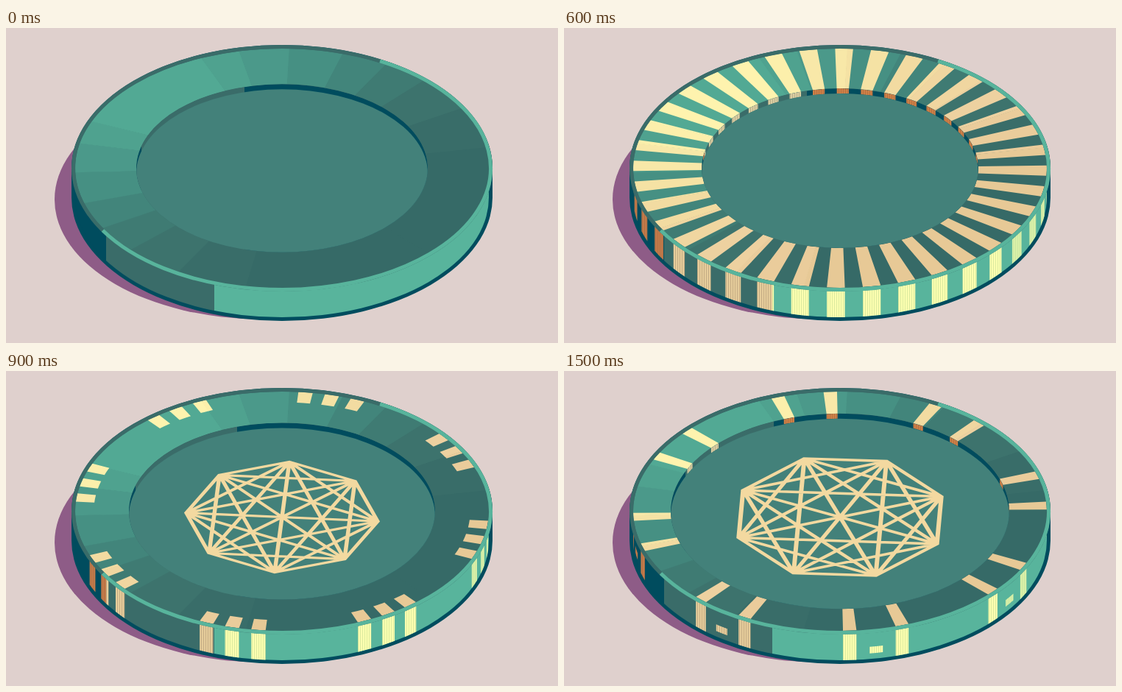
Write an HTML page that moves like this. It is 750x428 px and loops after 1.8 s.

```html
<!DOCTYPE html>
<html lang="en">
<head>
<meta charset="utf-8">
<title>Token patterns</title>
<style>
  html, body { margin: 0; width: 100%; height: 100%; overflow: hidden; background: #dfd0cd; }
  svg { display: block; width: 100%; height: 100%; }
</style>
</head>
<body>
<svg id="stage" viewBox="0 0 750 428"></svg>
<script>
const CX = 375, CY = 190.5, RX = 281, RY = 162.5, HEIGHT = 40;
const TILT = 0.577, WELL_DEPTH = 7, STEP = 300;
const DARK = '#004c5e', MID = '#3a6c69', LIGHT = '#58b49c', FLOOR = '#43817a', LINE = '#f3d9a0';

// Shading falls off on both sides of the light direction.
const LIGHT_ANGLE = 225;
const LIMITS = [22, 33, 47, 62, 75, 88, 105, 125, 180];
const GREEN = ['#52a994', '#4fa28f', '#4b998a', '#469083', '#42857b', '#3f7b73', '#3d736d', '#396d69', '#366a67'];
const CREAM = ['#fef3ae', '#fcefab', '#f8e8a8', '#f5e2a4', '#f2dba1', '#f0d6a0', '#edd1a0', '#eacc9b', '#e7c996'];

// Each side zone: left x, right x, wall fill, stripe fill.
const SIDE_ZONES = [
  [0, 136, DARK, 'brown'], [136, 283, MID, 'tan'],
  [283, 600, LIGHT, 'yellow'], [600, 750, LIGHT, 'lime']
];
const STRIPES = {
  brown: ['#c27b4a', '#b36f45'], tan: ['#e6cd9b', '#c4ab83'],
  yellow: ['#fcffb0', '#dcea9f'], lime: ['#d9f0a8', '#cbe7a2'],
  orange: ['#cc8048', '#b8703f'], sand: ['#d9cea2', '#b9ae8a']
};

const repeat = (count, offset, width) => Array.from({ length: count }, (_, i) => {
  const a = offset + i * 360 / count;
  return [a - width / 2, a + width / 2];
});

const DESIGNS = [
  { well: 198, tip: 184, split: 324, bars: [] },
  { well: 192, tip: 189, split: 330, bars: repeat(12, 0.45, 3.75) },
  { well: 188, tip: 191, split: 330, bars: repeat(36, 1.15, 5) },
  { well: 208, tip: 176, split: 314, reach: 0.91, star: [130.5, 4.4, 5.5],
    bars: [-7.45, 0, 7.45].flatMap(d => repeat(8, 14 + d, 4)) },
  { well: 229.5, tip: 163, split: 287, bars: repeat(8, 9.1, 18.7) },
  { well: 230, tip: 165, split: 285, star: [146, 25.6, 6], chips: repeat(8, 34.9, 3.75),
    bars: [-7.4, 7.4].flatMap(d => repeat(8, 34.9 + d, 3.75)) }
];

const f = n => n.toFixed(2);
function at(angle, rx, ry, dy = 0) {
  const a = angle * Math.PI / 180;
  return `${f(CX + rx * Math.cos(a))} ${f(CY + dy + ry * Math.sin(a))}`;
}
const arc = (angle, rx, ry, sweep, dy) => `A${f(rx)} ${f(ry)} 0 0 ${sweep} ${at(angle, rx, ry, dy)}`;
const ellipse = (rx, ry, dy, attrs) =>
  `<ellipse cx="${CX}" cy="${CY + dy}" rx="${rx}" ry="${f(ry)}" ${attrs}/>`;
const path = (d, attrs) => `<path d="${d}" ${attrs}/>`;

// Flat piece of the upper ring.
function sector(a0, a1, inner, fill) {
  const ix = inner[0], iy = inner[1];
  return path(`M${at(a0, RX, RY)}${arc(a1, RX, RY, 1)}L${at(a1, ix, iy)}${arc(a0, ix, iy, 0)}Z`, `fill="${fill}"`);
}

function shaded(a0, a1, inner, palette) {
  const cuts = [a0, a1];
  for (const limit of LIMITS) for (const sign of [-1, 1]) for (const turn of [-360, 0, 360]) {
    const cut = LIGHT_ANGLE + sign * limit + turn;
    if (cut > a0 && cut < a1) cuts.push(cut);
  }
  cuts.sort((a, b) => a - b);
  return cuts.slice(1).map((end, i) => {
    const start = cuts[i], middle = (start + end) / 2;
    const turn = ((middle - LIGHT_ANGLE) % 360 + 360) % 360;
    const level = LIMITS.findIndex(l => Math.min(turn, 360 - turn) <= l);
    return sector(start, end < a1 ? end + 0.15 : end, inner, palette[level]);
  }).join('');
}

// Upright piece of a curved wall.
const band = ([a0, a1], rx, ry, top, bottom) =>
  `M${at(a0, rx, ry, top)}${arc(a1, rx, ry, 1, top)}L${at(a1, rx, ry, bottom)}${arc(a0, rx, ry, 0, bottom)}Z`;

const hull = (rx, ry) =>
  `M${CX - rx} ${CY}${arc(0, rx, ry, 1)}L${CX + rx} ${CY + HEIGHT}${arc(180, rx, ry, 1, HEIGHT)}Z`;

function zoned(zones, shape, stripes) {
  return zones.map(([x0, x1, wall, stripe]) =>
    `<svg x="${x0}" y="0" width="${x1 - x0}" height="428" viewBox="${x0} 0 ${x1 - x0} 428">` +
    path(shape, `fill="${wall}"`) + path(stripes, `fill="url(#${stripe})"`) + '</svg>').join('');
}

function star([radius, offset, width]) {
  const corner = i => {
    const a = (offset + i * 45) * Math.PI / 180;
    return `${f(radius * Math.cos(a))} ${f(radius * Math.sin(a))}`;
  };
  let d = 'M' + [0, 1, 2, 3, 4, 5, 6, 7].map(corner).join('L') + 'Z';
  for (let i = 0; i < 8; i++)
    for (let j = i + 2; j < 8; j++)
      if (j - i < 7) d += `M${corner(i)}L${corner(j)}`;
  return path(d, `transform="translate(${CX} 198.5) scale(1 ${TILT})" fill="none" stroke="${LINE}" stroke-width="${width}"`);
}

function token({ well, tip, split, bars, reach, chips = [], star: rays }, id) {
  const wellY = well * TILT, inner = [well, wellY];
  const barEnd = reach ? [RX * reach, RY * reach] : inner;
  const sideStripes = bars.map(b => band(b, RX, RY, 0, HEIGHT))
    .concat(chips.map(c => band(c, RX, RY, 23.5, 32.5))).join('');
  const wellStripes = reach ? '' : bars.map(b => band(b, well, wellY, 0, WELL_DEPTH)).join('');
  const wellShape = `M${at(180, well, wellY)}${arc(0, well, wellY, 1)}${arc(180, well, wellY, 1)}Z`;
  const wellZones = [[0, tip, DARK, 'brown'], [tip, split, MID, 'sand'], [split, 750, DARK, 'orange']];
  return `<g display="none"><clipPath id="well${id}">${path(wellShape, '')}</clipPath>` +
    zoned(SIDE_ZONES, hull(RX, RY), sideStripes) +
    ellipse(RX + 1, RY + 1, 0, `fill="${MID}"`) +
    shaded(45, 405, inner, GREEN) +
    bars.map(b => shaded(...b, barEnd, CREAM)).join('') +
    `<g clip-path="url(#well${id})">` + zoned(wellZones, wellShape, wellStripes) +
    ellipse(well, wellY, WELL_DEPTH, `fill="${FLOOR}"`) + '</g>' +
    (rays ? star(rays) : '') + '</g>';
}

const patterns = Object.entries(STRIPES).map(([id, [base, line]]) =>
  `<pattern id="${id}" width="3" height="8" patternUnits="userSpaceOnUse">` +
  `<rect width="3" height="8" fill="${base}"/><rect x="1" width="1" height="8" fill="${line}"/></pattern>`).join('');

const stage = document.getElementById('stage');
const rim = [RX + 2.5, RY + 2.5];
stage.innerHTML = `<defs>${patterns}</defs><rect width="750" height="428" fill="#dfd0cd"/>` +
  `<ellipse cx="347" cy="233" rx="${RX}" ry="${RY}" fill="#8e5c87"/>` +
  path(hull(RX + 5, RY + 5), `fill="${DARK}"`) +
  `<g id="tokens">${DESIGNS.map(token).join('')}</g>` +
  ellipse(...rim, 0, `fill="none" stroke="${MID}" stroke-width="5"`) +
  path(`M${at(-62, ...rim)}${arc(45, ...rim, 1)}${arc(149.2, ...rim, 1)}`,
    `fill="none" stroke="${LIGHT}" stroke-width="5"`);

const tokens = [...document.getElementById('tokens').children];
const start = performance.now();
function draw() {
  const current = Math.floor((performance.now() - start) / STEP) % tokens.length;
  tokens.forEach((g, i) => g.setAttribute('display', i === current ? 'inline' : 'none'));
  requestAnimationFrame(draw);
}
draw();
</script>
</body>
</html>
```
